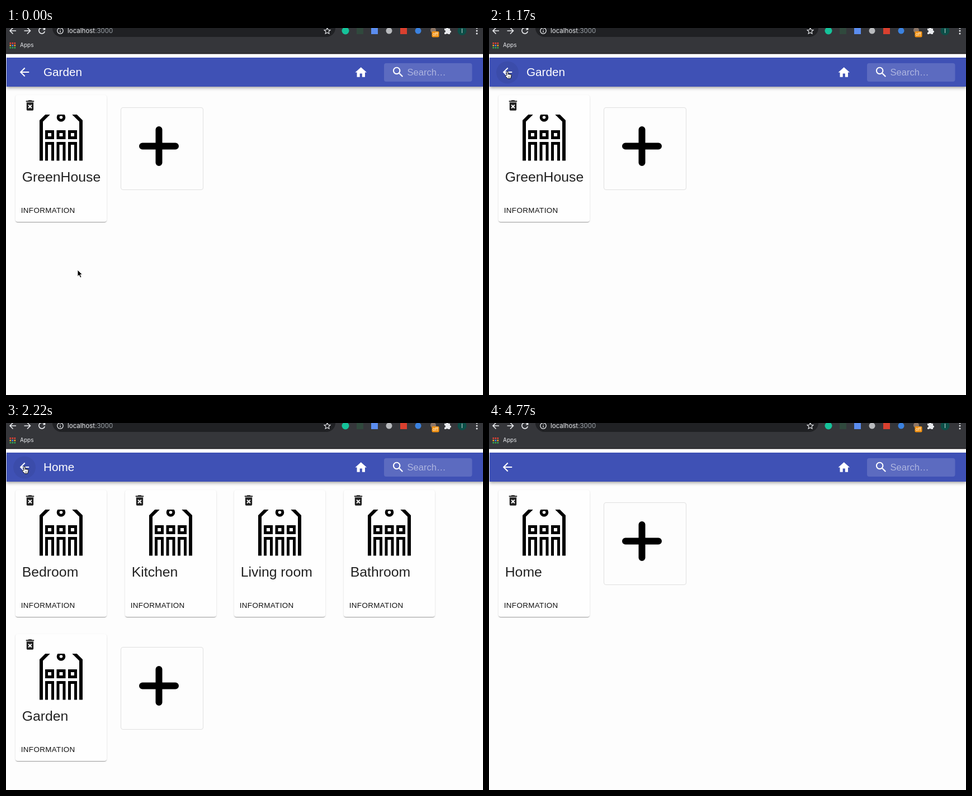
These frames come from a looping animation (853 px wide and 657 px high, 5.36 s). An HTML page:

```html
<!DOCTYPE html>
<html lang="en">
<head>
<meta charset="utf-8">
<title>Garden</title>
<style>
  html, body { margin: 0; width: 100%; height: 100%; overflow: hidden; background: #fdfdfd; }
  body { position: relative; font-family: "Liberation Sans", Arial, sans-serif; }
  svg { position: absolute; left: 0; top: 0; display: block; }
  .bar { position: absolute; left: 1px; top: 53px; width: 852px; height: 52px; background: #3f51b5;
    box-shadow: 0 2px 4px -1px rgba(0,0,0,.2), 0 4px 5px rgba(0,0,0,.14), 0 1px 8px rgba(0,0,0,.1); }
  .card { position: absolute; width: 163px; height: 227px; border-radius: 4px; background: #fefefe;
    box-shadow: 0 2px 1px -1px rgba(0,0,0,.2), 0 1px 1px rgba(0,0,0,.14), 0 1px 3px rgba(0,0,0,.12); }
  .add { position: absolute; box-sizing: border-box; left: 204.5px; width: 148px; height: 148px;
    border: 1px solid #e0e0e0; border-radius: 4px; }
  .chrome { font-family: Inter, Roboto, sans-serif; }
</style>
</head>
<body>
<div id="views"></div>
<div class="bar"></div>
<svg id="top" width="853" height="657">
  <g class="chrome">
    <rect y="46" width="853" height="7" fill="#fff"/>
    <rect width="853" height="46" fill="#35363a"/>
    <rect y="45" width="853" height="1.5" fill="#1d1b1f"/>
    <rect x="83" y="-16" width="506" height="32" rx="16" fill="#202124"/>
    <g fill="none" stroke="#e8eaed" stroke-width="1.6">
      <path d="M18 5H7.500M12.500-.5L7 5l5.500 5.500M32.500 5H43M38-.5L43.500 5 38 10.500"/>
      <path d="M68 1a5.300 5.300 0 1 0 1.300 5"/>
      <circle cx="97" cy="5" r="5.200" stroke-width="1.300"/>
      <path d="M97 4.500V8M97 2v1.300" stroke-width="1.300"/>
      <path d="M574.500-.3l1.600 3.600 3.900.4-2.900 2.600.8 3.900-3.400-2-3.400 2 .8-3.900-2.900-2.600 3.900-.4z" stroke-width="1.100"/>
    </g>
    <path d="M65.500 3.500h4.800v-5z" fill="#e8eaed"/>
    <text x="110" y="9" font-size="11.500" fill="#e8eaed">localhost<tspan fill="#9aa0a6">:3000</tspan></text>
    <circle cx="607" cy="5" r="6.500" fill="#15c39a"/>
    <rect x="627" y="-1" width="12" height="12" fill="#30493d"/>
    <rect x="653" y="-1" width="12" height="12" fill="#5b8def"/>
    <circle cx="685" cy="5" r="5.500" fill="#b9bbbe"/>
    <rect x="705" y="-1" width="12" height="12" fill="#d9402f"/>
    <circle cx="737" cy="5" r="5.500" fill="#3b82e0"/>
    <circle cx="764" cy="4" r="5" fill="#8d7768"/>
    <rect x="761.500" y="6" width="13" height="10.500" rx="2" fill="#f29111"/>
    <text x="768" y="14" font-size="7.500" text-anchor="middle" fill="#fff">off</text>
    <path d="M784 1h3a2 2 0 0 1 4 0h3v3.500a2 2 0 0 1 0 4V11h-3.500a2 2 0 0 0-3.500 0h-3V8a2 2 0 0 0 0-4z" fill="#e8eaed"/>
    <circle cx="815.500" cy="5" r="8" fill="#0c4f48"/>
    <text x="815.500" y="9" font-size="10" text-anchor="middle" fill="#dfe9e7">I</text>
    <path d="M842 0v.01M842 5v.01M842 10v.01" stroke="#e8eaed" stroke-width="3" stroke-linecap="round"/>
    <g id="apps"></g>
    <text x="25" y="34" font-size="10" fill="#e8eaed">Apps</text>
  </g>
  <g fill="#fff">
    <circle id="hover" cx="33" cy="79.500" r="20" fill="#000" fill-opacity=".06"/>
    <circle id="ripple" cx="33" cy="79.500"/>
    <path transform="translate(20.600 66.600) scale(1.030)" d="M20 11H7.830l5.590-5.590L12 4l-8 8 8 8 1.410-1.410L7.830 13H20v-2z"/>
    <text id="title" x="67" y="86" font-size="20.700"></text>
    <path transform="translate(622.400 67.200) scale(1.030)" d="M10 20v-6h4v6h5v-8h3L12 3 2 12h3v8z"/>
    <rect x="676" y="63" width="157.500" height="33" rx="4" fill-opacity=".15"/>
    <path transform="translate(688.900 66.700) scale(1.030)" d="M15.500 14h-.79l-.28-.27C15.410 12.590 16 11.110 16 9.500 16 5.910 13.090 3 9.500 3S3 5.910 3 9.500 5.910 16 9.500 16c1.610 0 3.090-.59 4.230-1.570l.27.28v.79l5 4.990L20.490 19l-4.990-5zm-6 0C7.010 14 5 11.990 5 9.500S7.010 5 9.500 5 14 7.010 14 9.500 11.990 14 9.500 14z"/>
    <text x="717.500" y="85" font-size="16.600" fill-opacity=".5">Search…</text>
  </g>
  <path id="arrow" d="M1.500 1v11.800l2.700-2.500 2.100 4.800 2.200-1-2.100-4.600h3.700z" fill="#000" stroke="#fff" stroke-width=".9"/>
  <g id="hand" stroke="#111" stroke-linejoin="round">
    <path d="M3.300 8V2a1.200 1.200 0 0 1 2.400 0v3l4.700 1q1.400.5 1.200 2l-.7 3-.7 2.600H5L1.200 9.500C.4 8.300 1.600 7.200 2.500 7.800z" fill="#fff"/>
    <path d="M5.700 5v2.200M7.700 5.600v1.800M9.600 6v1.600M6.300 9.500v2.500M8.300 9.500v2.500" fill="none" stroke-width=".7"/>
  </g>
</svg>
<script>
const LOOP = 5360;
const $ = id => document.getElementById(id);

const card = (name, col, row) => `
  <div class="card" style="left:${17 + 195.5 * col}px;top:${120 + 258 * row}px">
    <svg width="163" height="227" viewBox="17 120 163 227">
      <rect class="glow" x="17" y="155" width="163" height="150" fill="#f5f5f5" visibility="hidden"/>
      <path transform="translate(30.600 126.100) scale(1.030)" fill="#212121" d="M6 19c0 1.100.9 2 2 2h8c1.100 0 2-.9 2-2V7H6v12zm2.460-7.120l1.410-1.410L12 12.590l2.120-2.120 1.410 1.410L13.410 14l2.120 2.120-1.410 1.410L12 15.410l-2.120 2.120-1.410-1.410L10.590 14l-2.130-2.120zM15.500 4l-1-1h-5l-1 1H5v2h14V4z"/>
      <svg x="17" y="155" width="163" height="82.500" viewBox="17 155 163 82.500" fill="none" stroke="#000" stroke-width="5">
        <path d="M63 240V166.500L77 152.500M134 240V166.500L120 152.500" stroke-width="6"/>
        <circle cx="98.500" cy="160" r="5.300"/>
        ${[78, 98.5, 119].map(x => `<path d="M${x - 5.5} 185.500h11v11h-11zM${x - 5.5} 240v-33.500h11V240"/>`).join('')}
      </svg>
      <text x="28.700" y="275" font-size="24.800" fill="#212121">${name}</text>
      <text x="26.700" y="331" font-size="13.400" letter-spacing=".38" fill="#111">INFORMATION</text>
    </svg>
  </div>`;

const add = row => `
  <div class="add" style="top:${142 + 258.5 * row}px">
    <svg width="146" height="146"><path d="M38 68.500H97M67.500 39V98" stroke="#000" stroke-width="12" stroke-linecap="round"/></svg>
  </div>`;

const views = [
  { start: 0, title: 'Garden', cards: ['GreenHouse'] },
  { start: 1920, title: 'Home', cards: ['Bedroom', 'Kitchen', 'Living room', 'Bathroom', 'Garden'] },
  { start: 3420, title: '', cards: ['Home'] }
];
$('views').innerHTML = views.map(v => '<div>' +
  v.cards.map((name, i) => card(name, i % 4, i >> 2)).join('') +
  add(v.cards.length >> 2) + '</div>').join('');
const glow = document.querySelector('.glow');

$('apps').innerHTML = ['#ea4335', '#f6a623', '#34a853'].map((c, row) =>
  [0, 1, 2].map(col => `<rect x="${6.5 + 4 * col}" y="${26 + 4 * row}" width="2.600" height="2.600" fill="${
    row === 1 && col === 1 ? '#4285f4' : c}"/>`).join('')).join('');

// Pointer: start time, shape, left, top
const pointer = [
  [0, 'arrow', 126.5, 432], [150, 'arrow', 126.5, 429], [450, 'arrow', 115, 354],
  [590, 'arrow', 90, 249], [730, 'arrow', 64.5, 146], [880, 'arrow', 50, 99.500],
  [1030, 'hand', 36.5, 84.5], [1170, 'hand', 28.5, 77],
  [4470, 'arrow', 56, 116], [4620, 'arrow', 389, 541], [4770, '', 0, 0]
];
// Ripple: start time, radius, opacity
const ripples = [
  [0, 0, 0], [1770, 12, .2], [1920, 20, .12], [2220, 0, 0], [3420, 15, .16], [3570, 0, 0]
];

const at = (list, t) => list.findLast(step => step[0] <= t);
const show = (el, on) => el.setAttribute('visibility', on ? 'visible' : 'hidden');

function draw(now) {
  const t = now % LOOP;
  const view = views.findLast(v => v.start <= t);
  views.forEach((v, i) => { $('views').children[i].style.display = v === view ? '' : 'none'; });
  $('title').textContent = view.title;
  show(glow, t >= 590 && t < 880);
  show($('hover'), t >= 1030 && t < 4470);

  const [, r, alpha] = at(ripples, t);
  $('ripple').setAttribute('r', r);
  $('ripple').setAttribute('fill-opacity', alpha);

  const [, shape, x, y] = at(pointer, t);
  for (const id of ['arrow', 'hand']) {
    show($(id), id === shape);
    $(id).setAttribute('transform', `translate(${x} ${y})`);
  }
}

const begin = performance.now();
function tick() {
  draw(performance.now() - begin);
  requestAnimationFrame(tick);
}
tick();
</script>
</body>
</html>
```
